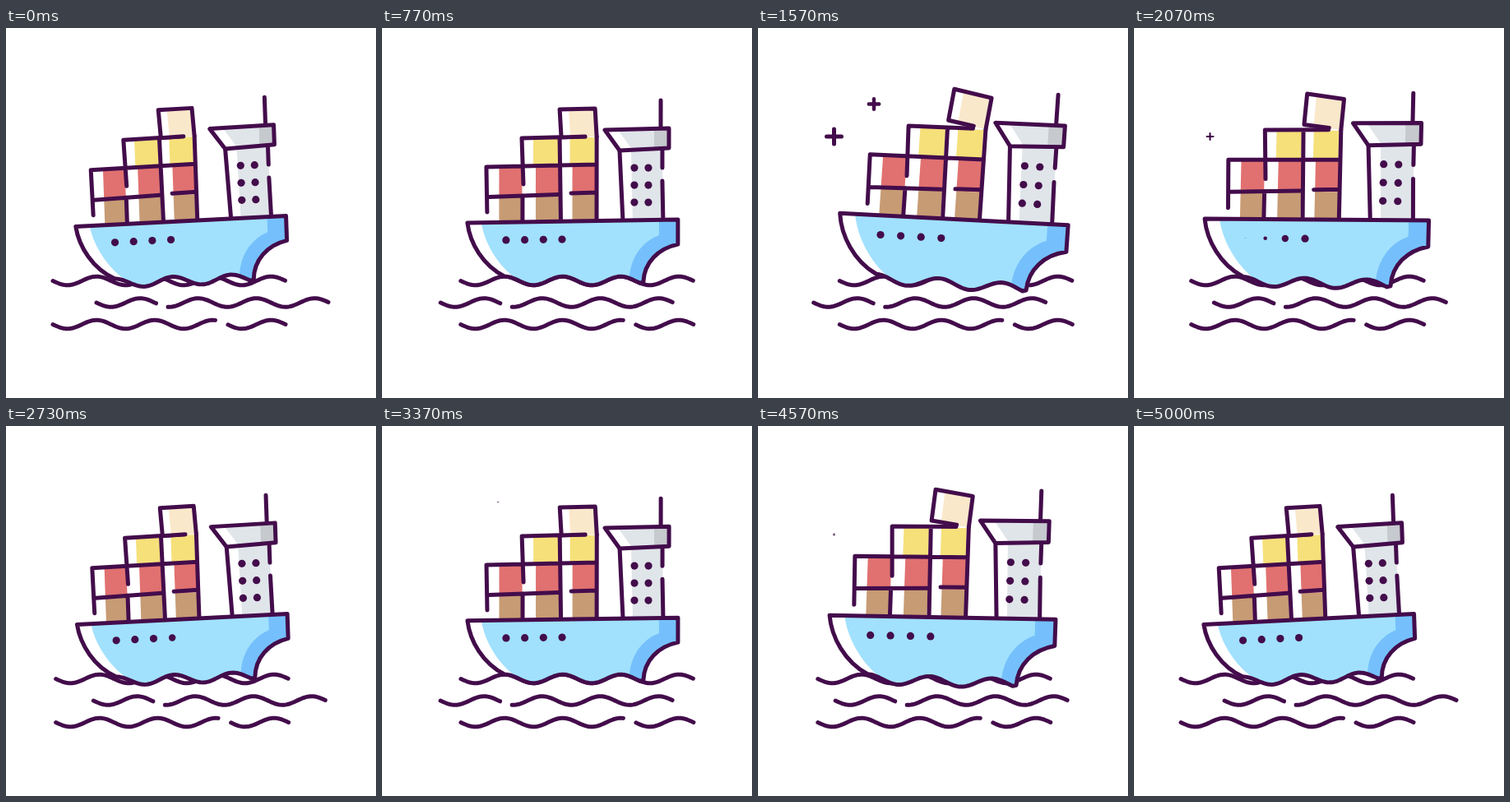
An HTML page with a canvas for the animation above (5.03 s loop, 450 by 450 pixels).

```html
<!DOCTYPE html>
<html lang="en">
<head>
<meta charset="utf-8">
<title>Cargo ship</title>
<style>
html, body { margin: 0; width: 100%; height: 100%; overflow: hidden; background: #fff; }
canvas { display: block; width: 450px; height: 450px; }
</style>
</head>
<body>
<canvas id="stage"></canvas>
<script>
const canvas = document.getElementById('stage');
const ctx = canvas.getContext('2d');
const ratio = Math.max(1, window.devicePixelRatio || 1);
canvas.width = canvas.height = 450 * ratio;

const LOOP = 5030, END = 5000, SWING = 2.5;
const INK = '#430c4b', LINE = 5;
const BROWN = '#c79b74', RED = '#e07170', YELLOW = '#f6e07a', CREAM = '#fae8cb';
const GREY = '#e0e5e9', DARK_GREY = '#c6c9ce', BLUE = '#a1e1fd', DARK_BLUE = '#75c0fc';

// Eased 0 to 1 between a and b; bump comes back to 0 between c and d.
const rise = (t, a, b) => (1 - Math.cos(Math.PI * Math.min(1, Math.max(0, (t - a) / (b - a))))) / 2;
const bump = (t, a, b, c, d) => rise(t, a, b) - rise(t, c, d);

// Time within a swing; the second swing runs a little late in its middle.
function phaseAt(t) {
  if (t < SWING) return t;
  const v = t - SWING;
  return v - 0.11 * Math.sin(Math.PI * v / SWING);
}

function shape(d, m) {
  const path = new Path2D();
  path.addPath(new Path2D(d), m);
  return path;
}
function fill(d, m, color) {
  ctx.fillStyle = color;
  ctx.fill(shape(d, m));
}
function stroke(d, m, width = LINE) {
  ctx.lineWidth = width;
  ctx.stroke(shape(d, m));
}
function dot(x, y, r, m) {
  if (r <= 0) return;
  const p = m.transformPoint(new DOMPoint(x, y));
  ctx.fillStyle = INK;
  ctx.beginPath();
  ctx.arc(p.x, p.y, r, 0, 7);
  ctx.fill();
}

// Waves: four periods of a sine, some with a gap.
const WAVE = 283;
function swell(from, to, dx = 0, dy = 0) {
  const points = [];
  for (let x = from; x <= to; x += 2.5) {
    points.push(`${x + dx},${dy + 5.3 * Math.sin(8 * Math.PI * x / WAVE)}`);
  }
  return points.join('L');
}
const wave = (gapFrom, gapTo) => `M${swell(0, gapFrom)}M${swell(gapTo, WAVE)}`;
const ROWS = { top: wave(140, 140), middle: wave(73, 87), bottom: wave(198, 213) };

function drawWaves(sway) {
  const x = 53 * sway;
  const row = (d, left, y) => stroke(d, new DOMMatrix().translate(left, y));
  row(ROWS.top, 57 + x, 307.5);
  row(ROWS.middle, 110 - x, 334);
  row(ROWS.bottom, 57 + x, 360.5);
}

function drawBoxes(m, open) {
  fill('M128 169L171 168V134L217 133L262 132V232L129 236Z', m, '#fff');
  for (let i = 0; i < 3; i++) {
    const x = 143.5 + 44.5 * i;
    fill(`M${x} 203h28v33h-28Z`, m, BROWN);
    fill(`M${x} 168h28v35h-28Z`, m, RED);
    if (i) fill(`M${x - 3} 133h30v34h-30Z`, m, YELLOW);
  }
  stroke('M129 224L128 169L262 166M131 205.5L215 202.5M231 201L262 200'
    + 'M173 190L171 134L247 132M172 204V235M217 133L218.5 234M262 132V232', m);

  // The top crate tips up around its lower right corner.
  const c = m.translate(262, 132).rotate(10.7 * open).scale(1 + 0.05 * open).translate(-262, -132);
  fill('M217 99L260 98L262 132L219 133Z', c, '#fff');
  fill('M228 99L260 98L262 132L230 133Z', c, CREAM);
  stroke('M262 132L260 98L217 99L219 133L248 132', c);
}

function drawTower(m) {
  fill('M290 149H342L343 234H294Z', m, '#fff');
  fill('M304 149H342L343 234H306Z', m, GREY);
  stroke('M294 233L290 149M342 149V170M342 186L343 233', m);
  for (let i = 0; i < 6; i++) dot(308 + 17 * (i % 2), 170 + 21 * (i >> 1), 4.6, m);
  stroke('M340 88V122', m);
  fill('M272 124L350 122V146L290 149Z', m, '#fff');
  fill('M288 124L350 122V146L306 149Z', m, GREY);
  fill('M332 122H350V146L332 147Z', m, DARK_GREY);
  stroke('M272 124L350 122V146L290 149Z', m);
}

// The keel follows the top wave row.
const keel = from => 'L' + swell(from - 97, 219, 97, 307.5);
const STERN = 'L319 309C320 285 337 268 361 263V233Z';
const HULL = 'M105 237C108 262 124 289 150 302' + keel(150) + STERN;
const HULL_BLUE = 'M122 237C126 262 142 288 163 304' + keel(163) + STERN;
const HULL_DARK = 'M338 233V252C317 260 303 280 302 305' + keel(302) + STERN;

function drawHull(m, t) {
  fill(HULL, m, '#fff');
  fill(HULL_BLUE, m, BLUE);
  fill(HULL_DARK, m, DARK_BLUE);
  stroke(HULL, m);
  for (let i = 0; i < 4; i++) {
    const blink = bump(t - 1.81 - 0.1 * i, 0, 0.32, 0.36, 0.68);
    dot(152 + 22.7 * i, 258 - 0.3 * i, 4.6 * (1 - blink), m);
  }
}

// Each spark pops twice per loop.
function drawSpark(x, y, arm, width, age) {
  const pop = s => bump(s, 0, 0.42, 0.7, 1.2);
  const size = pop(age) + pop(age - 2.4);
  if (size < 0.01) return;
  stroke(`M${-arm} 0H${arm}M0 ${-arm}V${arm}`,
    new DOMMatrix().translate(x, y).scale(size), width * size);
}

function draw(ms) {
  const t = Math.min(ms % LOOP, END) / 1000, u = phaseAt(t);
  const sway = bump(u, 0, 1.18, 1.18, SWING);
  const swellUp = bump(u, 0.8, 1.65, 1.85, SWING);
  const tilt = -2.94 + 6.04 * bump(u, 0.15, 1.7, 1.7, SWING);

  const ship = new DOMMatrix()
    .translate(212 + 23 * sway, 300 + 2.8 * swellUp)
    .rotate(tilt + 0.9)
    .scale(1 + 0.087 * swellUp)
    .translate(-230, -300);

  // Cargo slides with the tilt and spreads a little as the ship moves out.
  const spread = sway * (1 - swellUp);
  const cargo = ship
    .translate(195 + 1.4 * (tilt - 1) + 3.6 * spread, 0)
    .scale(0.95 + 0.07 * spread, 1)
    .translate(-195, 0);

  ctx.setTransform(ratio, 0, 0, ratio, 0, 0);
  ctx.fillStyle = '#fff';
  ctx.fillRect(0, 0, 450, 450);
  ctx.strokeStyle = INK;
  ctx.lineCap = ctx.lineJoin = 'round';
  drawWaves(sway);
  drawBoxes(cargo, swellUp);
  drawTower(ship);
  drawHull(ship, t);
  drawSpark(92.5, 132, 9, 5, t - 1.1);
  drawSpark(141, 92.5, 6.2, 4.4, t - 0.88);
}

const begin = performance.now();
function tick() {
  draw(performance.now() - begin);
  requestAnimationFrame(tick);
}
tick();
</script>
</body>
</html>
```
